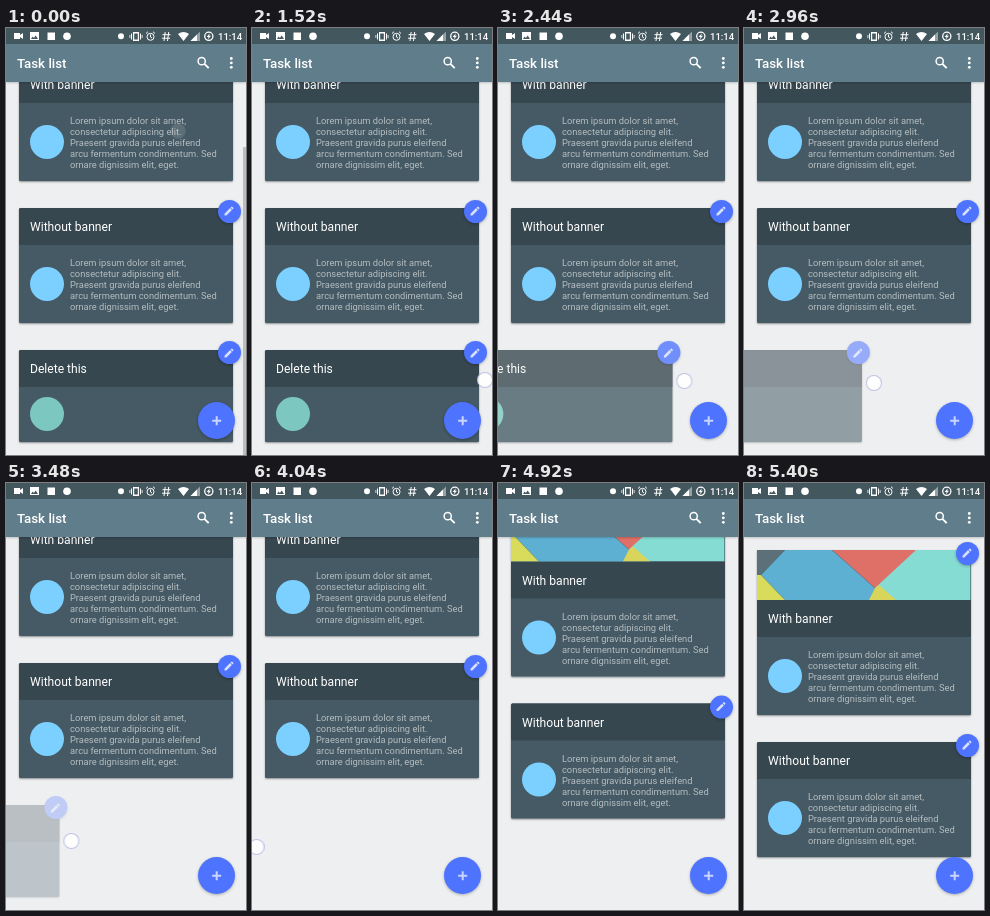
Recreate the animation shown at these times as an HTML page. Size 240x427 px, loop 5.44 s.

```html
<!DOCTYPE html>
<html lang="en">
<head>
<meta charset="utf-8">
<title>Task list</title>
<style>
  @property --drag { syntax: "<number>"; inherits: true; initial-value: 0; }

  :root { --loop: 5440ms linear infinite; --accent: #4d73ff; }

  html, body { margin: 0; width: 100%; height: 100%; overflow: hidden; }

  .stage {
    position: relative; width: 240px; height: 427px; overflow: hidden;
    background: #edeff1; color: #fff;
    font-family: Roboto, sans-serif;
    animation: drag var(--loop);
  }
  .stage * { box-sizing: border-box; }
  .stage svg { position: absolute; display: block; }

  .status { position: absolute; z-index: 3; width: 240px; height: 16px; background: #43575f; }
  .status svg { left: 0; top: 0; }
  .clock { position: absolute; left: 212px; top: 0; font: 500 9.5px/17px Roboto, sans-serif; }

  .toolbar {
    position: absolute; z-index: 2; top: 16px; width: 240px; height: 38px;
    background: #607d8b; box-shadow: 0 1px 2px rgba(0, 0, 0, .2);
    font: 500 13.33px/39px Roboto, sans-serif; padding-left: 11px;
  }
  .toolbar svg { left: 0; top: 0; }

  .list { position: absolute; inset: 0; animation: scroll var(--loop); }

  .card {
    position: absolute; left: 13.3px; width: 213.4px;
    background: #455a64; border-radius: 1.5px;
    box-shadow: 0 1px 2px rgba(0, 0, 0, .4);
  }
  .card h2 {
    margin: 0; height: 37px; padding-left: 10.7px; background: #37474f;
    font: 400 12.1px/39.5px Roboto, sans-serif; border-radius: 1.5px 1.5px 0 0;
  }
  .card p {
    position: absolute; left: 50.7px; bottom: 10px; margin: 0;
    font-size: 9.33px; line-height: 10.93px; white-space: pre; color: #b5bdc1;
  }
  .avatar {
    position: absolute; left: 10.7px; bottom: 22px;
    width: 34px; height: 34px; border-radius: 50%; background: #7bd0ff;
  }
  .banner { position: relative !important; width: 213.4px; height: 50px; }
  .removable {
    translate: calc(var(--drag) * 1px);
    opacity: calc(1 + var(--drag) / 240);
  }
  .removable .avatar { bottom: 11px; background: #7cc8c1; }

  .edit, .add {
    position: absolute; border-radius: 50%; background: var(--accent);
    box-shadow: 0 1px 3px rgba(0, 0, 0, .28);
  }
  .edit { left: 198.4px; top: -8.3px; width: 23px; height: 23px; }
  .edit svg { left: 5.5px; top: 5.5px; width: 12px; height: 12px; }
  .add { z-index: 1; left: 192px; top: 374px; width: 37.4px; height: 37.4px; }
  .add svg { left: 0; top: 0; }

  .scrollbar {
    position: absolute; right: 0; top: 119px; width: 2.7px; height: 308px;
    background: rgba(0, 0, 0, .21); animation: scrollbar var(--loop);
  }

  .finger {
    position: absolute; z-index: 4; width: 16px; height: 16px; margin: -8px;
    border-radius: 50%; background: rgba(255, 255, 255, .92);
    border: 1px solid rgba(140, 145, 205, .55);
  }
  .tap { left: 172px; top: 103px; animation: tap var(--loop); }
  .swipe {
    left: 238.5px; translate: calc(var(--drag) * 1px);
    animation: touch var(--loop), approach var(--loop);
  }

  @keyframes drag {
    0%, 28.3% { --drag: 0; }
    28.31% { --drag: -6; }
    32.35% { --drag: -13; }
    38.6% { --drag: -30; }
    44.85% { --drag: -52.5; }
    54.41% { --drag: -109; }
    63.97% { --drag: -173.5; }
    73.16%, 100% { --drag: -234.5; }
  }
  /* the finger travels the touch slop before the card follows */
  @keyframes approach {
    0%, 22.75% { left: 238.5px; top: 352px; }
    28.3% { left: 232.5px; top: 352px; }
    28.31% { left: 238.5px; top: 352px; }
    44.85% { left: 238.5px; top: 352.5px; }
    63.97% { left: 238.5px; top: 358px; }
    73.16%, 100% { left: 238.5px; top: 364px; }
  }
  @keyframes touch {
    0%, 22.75% { opacity: 0; }
    22.79%, 79% { opacity: 1; }
    81.6%, 100% { opacity: 0; }
  }
  @keyframes tap {
    0% { opacity: .14; }
    1.5%, 100% { opacity: 0; }
  }
  @keyframes scrollbar {
    0%, 6.5% { opacity: 1; }
    14.2%, 100% { opacity: 0; }
  }
  @keyframes scroll {
    0% { transform: translateY(-79px); }
    86.51% { transform: translateY(-79px); animation-timing-function: cubic-bezier(.364, 0, .636, 1); }
    94.28%, 100% { transform: none; }
  }
</style>
</head>
<body>
<svg width="0" height="0" style="position:absolute">
  <symbol id="pencil" viewBox="0 0 24 24">
    <path fill="#fff" fill-opacity=".78" d="M3 17.25V21h3.75L17.81 9.94l-3.75-3.75zM20.71 7.04a1 1 0 0 0 0-1.41l-2.34-2.34a1 1 0 0 0-1.41 0l-1.83 1.83 3.75 3.75z"/>
  </symbol>
</svg>

<div class="stage">
  <div class="status">
    <svg width="240" height="16" fill="#fff">
      <path d="M8 5h6v2l3-2v6l-3-2v2H8z"/>
      <path fill-rule="evenodd" d="M24 4h9v8h-9zm1 7h7l-2.3-3.4-1.8 2.3-1.2-1.4z"/>
      <rect x="41.5" y="4.5" width="7.5" height="7.5"/>
      <circle cx="61" cy="8.3" r="3.8"/>
      <circle cx="115" cy="8.3" r="3"/>
      <path d="M127 4h6v9h-6zM125 5.5h1v6h-1zM134 5.5h1v6h-1zM123.5 7h.8v3h-.8zM135.7 7h.8v3h-.8z"/>
      <path fill="#43575f" d="M128.2 5.5h3.6v6h-3.6z"/>
      <g fill="none" stroke="#fff">
        <circle cx="144.5" cy="8.8" r="3.5"/>
        <path d="M144.5 6.5v2.5l1.5 1M140 5.5l2-1.8M149 5.5l-2-1.8"/>
        <path d="M159.2 4l-1.2 9M162.7 4l-1.2 9M156.5 6.7h8M156 10.2h8"/>
        <circle cx="202.8" cy="8.3" r="4.1" stroke-width="1.3"/>
      </g>
      <path d="M172 6q5.500-4 11 0l-5.500 7z"/>
      <path fill-opacity=".45" d="M194 3.5v9.500h-9.500z"/>
      <path d="M191 6.5v6.500h-6.500z"/>
      <path d="M203.8 5.2l-3.2 3.700h1.900l-.7 2.600 3.200-3.700h-1.900z"/>
    </svg>
    <span class="clock">11:14</span>
  </div>

  <div class="toolbar">Task list
    <svg width="240" height="38">
      <g fill="none" stroke="#fff" stroke-width="1.5">
        <circle cx="195.7" cy="17.2" r="3.6"/>
        <path stroke-width="1.9" d="M198.400 19.900l4.300 4.300"/>
      </g>
      <g fill="#fff">
        <circle cx="225.3" cy="14.500" r="1.4"/>
        <circle cx="225.3" cy="18.900" r="1.4"/>
        <circle cx="225.3" cy="23.300" r="1.4"/>
      </g>
    </svg>
  </div>

  <div class="list">
    <section class="card" style="top:67px;height:165px">
      <svg class="banner" viewBox="0 0 213.4 50">
        <path fill="#85dcd2" d="M0 0h213.4v50H0z"/>
        <path fill="#5eb0d3" d="M28 0h48l43 38-6 12H28L4 25z"/>
        <path fill="#5b7079" d="M0 0h28L4 25 0 27z"/>
        <path fill="#d9dc5b" d="M0 25h4l24 25H0z"/>
        <path fill="#df7068" d="M75 0h84l-41 38z"/>
        <path fill="#d9d45a" d="M118 38l4-3 17 15h-27z"/>
        <path fill="none" stroke="#35505c" stroke-opacity=".4" d="M28 0L4 25l24 25M75 0l43 38"/>
      </svg>
      <h2>With banner</h2>
      <div class="avatar"></div>
      <p>Lorem ipsum dolor sit amet,
consectetur adipiscing elit.
Praesent gravida purus eleifend
arcu fermentum condimentum. Sed
ornare dignissim elit, eget.</p>
      <div class="edit"><svg><use href="#pencil"/></svg></div>
    </section>

    <section class="card" style="top:259px;height:115px">
      <h2>Without banner</h2>
      <div class="avatar"></div>
      <p>Lorem ipsum dolor sit amet,
consectetur adipiscing elit.
Praesent gravida purus eleifend
arcu fermentum condimentum. Sed
ornare dignissim elit, eget.</p>
      <div class="edit"><svg><use href="#pencil"/></svg></div>
    </section>

    <section class="card removable" style="top:400.7px;height:92.3px">
      <h2>Delete this</h2>
      <div class="avatar"></div>
      <div class="edit"><svg><use href="#pencil"/></svg></div>
    </section>
  </div>

  <div class="scrollbar"></div>
  <div class="add">
    <svg width="37.4" height="37.4"><path stroke="#fff" stroke-opacity=".7" stroke-width="2" d="M14.200 18.700h9M18.700 14.200v9"/></svg>
  </div>
  <div class="finger tap"></div>
  <div class="finger swipe"></div>
</div>
</body>
</html>
```
